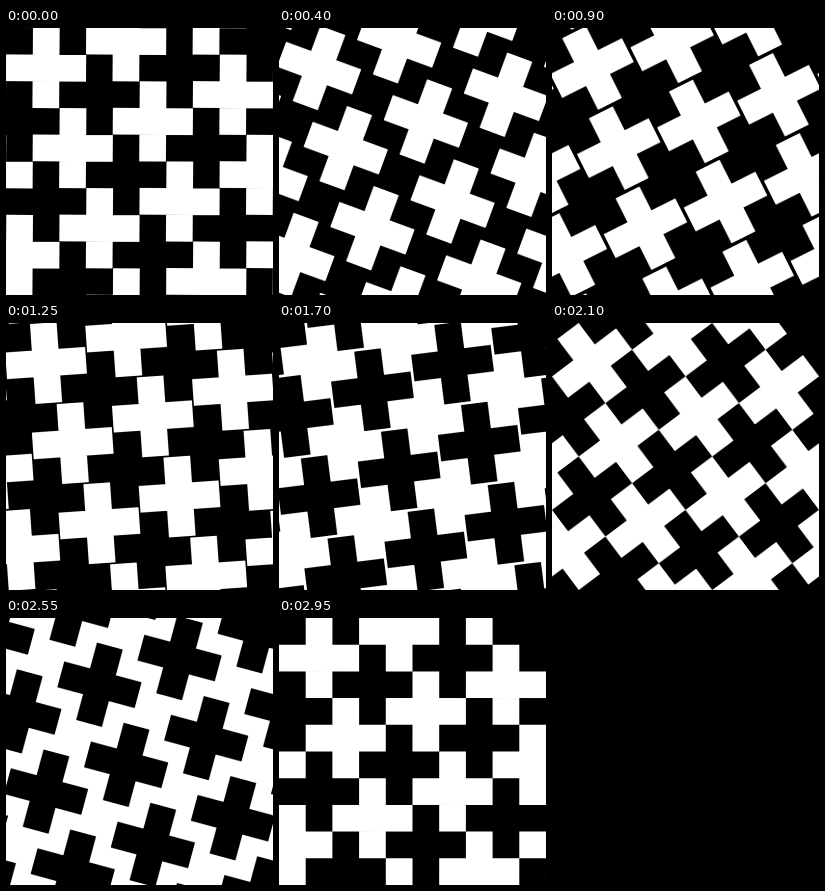
Write an HTML page with a canvas that moves like this. It is 267 px wide and 267 px high and loops after 3 s.

```html
<!DOCTYPE html>
<html lang="en">
<head>
<meta charset="utf-8">
<title>Turning crosses</title>
<style>
  html, body { margin: 0; width: 100%; height: 100%; overflow: hidden; background: #000; }
  canvas { display: block; width: 100vw; height: 100vh; }
</style>
</head>
<body>
<canvas id="stage" width="267" height="267"></canvas>
<script>
  const SIZE = 267, CELL = SIZE / 10;
  const STEP = 50, STEPS = 60, HALF = STEPS / 2;
  const SAMPLES = 5, SHUTTER = 0.5;
  const ctx = document.getElementById('stage').getContext('2d');

  const ease = p => p * p * (3 - 2 * p);

  function addCross(x, y, angle) {
    ctx.setTransform(CELL, 0, 0, CELL, x * CELL, y * CELL);
    ctx.rotate(angle);
    ctx.rect(-1.5, -0.5, 3, 1);
    ctx.rect(-0.5, -1.5, 1, 3);
  }

  // One colour of cross sits on a lattice spanned by (3, -1) and (1, 3).
  function fillCrosses(x0, y0, angle) {
    ctx.beginPath();
    for (let a = -4; a <= 5; a++) {
      for (let b = -4; b <= 5; b++) {
        const x = x0 + 3 * a + b, y = y0 - a + 3 * b;
        if (x > -2 && x < 12 && y > -2 && y < 12) addCross(x, y, angle);
      }
    }
    ctx.setTransform(1, 0, 0, 1, 0, 0);
    ctx.fill();
  }

  function fillStage(mode, color) {
    ctx.globalCompositeOperation = mode;
    ctx.globalAlpha = 1;
    ctx.fillStyle = color;
    ctx.fillRect(0, 0, SIZE, SIZE);
  }

  function draw(step) {
    const start = (step + 1) % STEPS;
    const dark = start >= HALF;

    fillStage('source-over', '#000');
    ctx.globalCompositeOperation = 'lighter';
    ctx.globalAlpha = 1 / SAMPLES;
    ctx.fillStyle = '#fff';
    for (let k = 0; k < SAMPLES; k++) {
      const p = (start % HALF + k * SHUTTER / SAMPLES) / HALF;
      const turn = ease(p) * Math.PI / 2;
      if (dark) fillCrosses(3.5, 2.5, -turn);
      else fillCrosses(1.5, 1.5, turn);
    }
    // Dark crosses are the negative of light ones.
    if (dark) fillStage('difference', '#fff');
  }

  const origin = performance.now();
  let shown = -1;
  function tick() {
    const step = Math.floor((performance.now() - origin) / STEP) % STEPS;
    if (step !== shown) draw(shown = step);
    requestAnimationFrame(tick);
  }
  tick();
</script>
</body>
</html>
```
